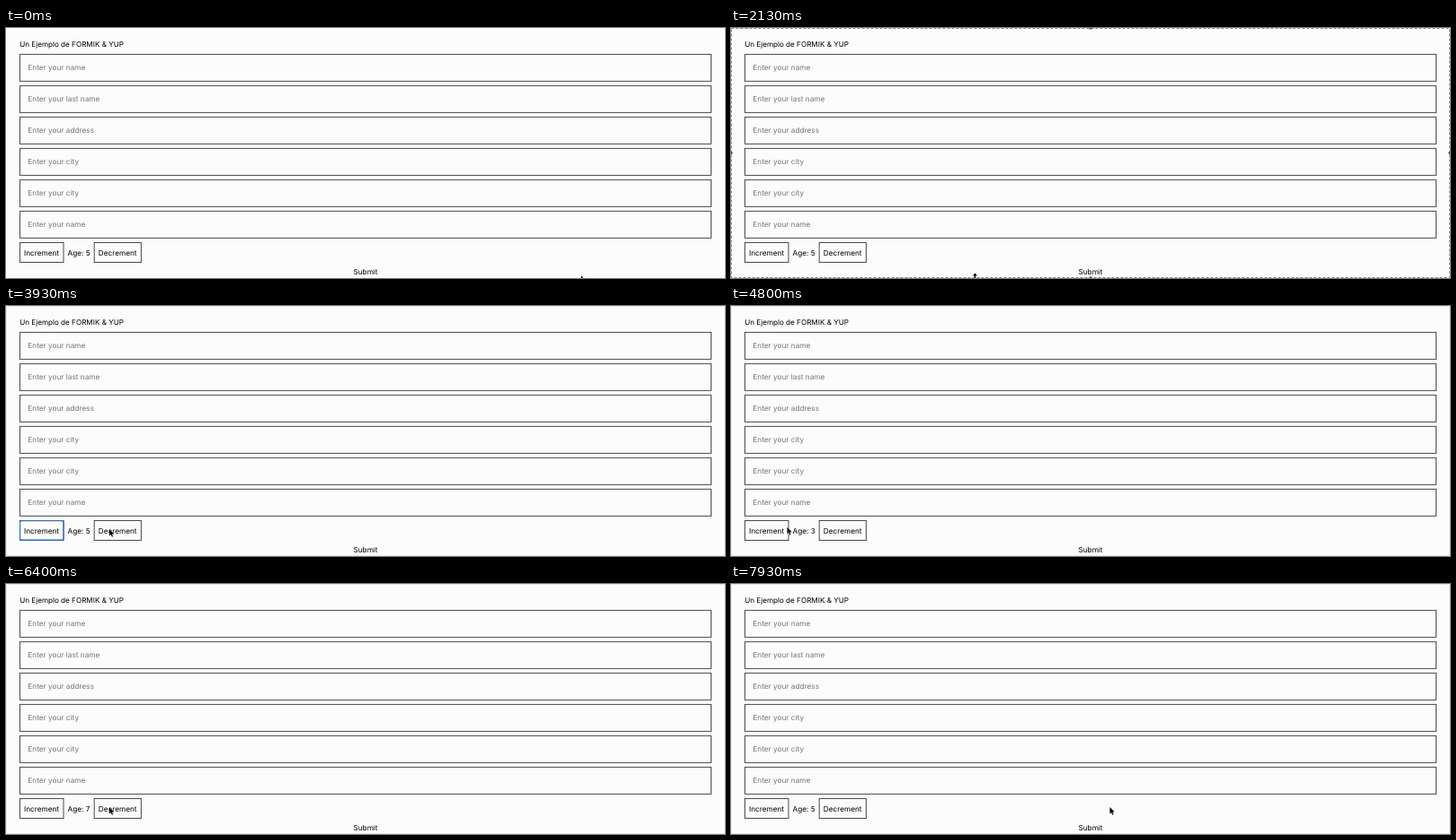
Recreate the animation shown at these times as an HTML page. Size 800 by 279 pixels, loop 8000 ms.

```html
<!DOCTYPE html>
<html lang="es">
<head>
<meta charset="utf-8">
<title>Form</title>
<style>
  html, body { margin: 0; width: 100%; height: 100%; overflow: hidden; background: #fcfcfc; }
  svg { display: block; width: 100%; height: 100%; font: 8.23px Inter, sans-serif; text-rendering: geometricPrecision; }
  .title { font-size: 8.15px; }
  .hint { font-size: 8.28px; fill: #757575; }
  .box { fill: none; stroke: #4a4a4a; }
  #edge { fill: none; stroke: #e9e9e9; }
  #selection rect { fill: none; stroke: #8a8a8a; stroke-dasharray: 3 2; }
  #selection circle { fill: #555; }
  #ring { fill: none; stroke: #2b70cf; stroke-width: 1.2; }
  .pointer { stroke: #fff; stroke-width: .8; paint-order: stroke; }
</style>
</head>
<body>
<svg viewBox="0 0 800 279">
  <text class="title" x="15.2" y="21">Un Ejemplo de FORMIK &amp; YUP</text>
  <g id="fields"></g>

  <rect class="box" x="15.5" y="239.5" width="48.5" height="22"/>
  <text x="20" y="253.5">Increment</text>
  <g id="focus">
    <rect id="ring" x="15.6" y="239.6" width="48.6" height="21.6" rx="2"/>
    <path d="M17 239.5H63" stroke="#567" stroke-dasharray="1 1"/>
  </g>
  <text id="age" x="68.5" y="253.5"></text>
  <g id="decrement">
    <rect class="box" x="98.2" y="239.5" width="52.2" height="22"/>
    <text x="102.8" y="253.5">Decrement</text>
  </g>
  <text x="400" y="275" text-anchor="middle">Submit</text>

  <rect id="edge" x=".5" y=".5" width="799" height="278"/>
  <g id="selection">
    <rect x=".5" y=".5" width="799" height="278"/>
    <circle cx="400" cy="0" r="1.8"/>
    <circle cx="400" cy="279" r="1.8"/>
    <circle cx="0" cy="139.5" r="1.8"/>
    <circle cx="800" cy="139.5" r="1.8"/>
  </g>
  <path id="resize" class="pointer" d="M271.5 273.5L274 276.5H272.2V279H270.8V276.5H269Z"/>
  <path id="arrow" class="pointer" d="M0 0V7.6L1.7 6L2.9 8.7L4.1 8.2L2.9 5.6H5.3Z"/>
</svg>

<script>
const LOOP = 8000, STEPS = 120;
const $ = id => document.getElementById(id);

const hints = ['name', 'last name', 'address', 'city', 'city', 'name'];
$('fields').innerHTML = hints.map((hint, i) => `
  <rect class="box" x="15.5" y="${29.4 + 35 * i}" width="769" height="30"/>
  <text class="hint" x="24.3" y="${47 + 35 * i}">Enter your ${hint}</text>`).join('');

const clamp = (v, min, max) => Math.min(max, Math.max(min, v));
const ramp = (v, from, to) => clamp((v - from) / (to - from), 0, 1);
const smooth = k => k * k * (3 - 2 * k);
const easeIn = k => k ** 3;
const easeOut = k => 1 - (1 - k) ** 2;
const show = (id, opacity) => $(id).setAttribute('opacity', Number(opacity));

const bottom = [640, 276.5], resizeGrip = [271, 276], besideForm = [153.5, 261.7];
const onDecrement = [115, 249], onIncrement = [45, 246];
const exit = [698, 189], entry = [768, 272], aboveSubmit = [421.5, 249];

// Pointer travel; lift bends the way upwards
const moves = [
  { start: 0, end: 32, from: bottom, to: bottom },
  { start: 32, end: 43, from: resizeGrip, to: besideForm, ease: easeOut },
  { start: 45, end: 54, from: besideForm, to: onDecrement, ease: smooth },
  { start: 68, end: 76, from: onDecrement, to: onIncrement, ease: easeOut },
  { start: 86, end: 92, from: onIncrement, to: onDecrement, ease: smooth },
  { start: 100, end: 106, from: onDecrement, to: exit, ease: easeIn },
  { start: 112, end: 119, from: entry, to: aboveSubmit, ease: easeOut, lift: 40 }
];

function pointerAt(step) {
  const { start, end, from, to, ease = smooth, lift = 0 } = moves.findLast(m => m.start <= step);
  const k = ease(ramp(step, start, end));
  const [x, y] = from.map((v, i) => v + (to[i] - v) * k);
  return [x, y - lift * Math.sin(Math.PI * k)];
}

const pointerVisible = step => step < 2 || step > 32 && step < 107 || step >= 112;

// Number of evenly spaced clicks made so far
const clicks = (step, first, gap, count) => clamp(Math.floor((step - first) / gap) + 1, 0, count);
const ageAt = step => 5 - clicks(step, 64, 2, 2) + clicks(step, 76, 2.5, 5) - clicks(step, 94, 3.5, 3);

function draw(time) {
  const step = Math.floor((time + 10) % LOOP / LOOP * STEPS);
  const age = ageAt(step);
  $('age').textContent = `Age: ${age}`;
  $('decrement').setAttribute('transform', `translate(${age === 8 ? -.5 : 0})`);

  show('focus', step >= 59 && step < 61);
  show('selection', ramp(step, 13, 18) * (1 - ramp(step, 32, 36)));
  show('edge', step >= 33);
  show('resize', step === 32);
  show('arrow', pointerVisible(step));
  $('arrow').setAttribute('transform', `translate(${pointerAt(step)})`);
}

const start = performance.now();
function tick() {
  draw(performance.now() - start);
  requestAnimationFrame(tick);
}
tick();
</script>
</body>
</html>
```
